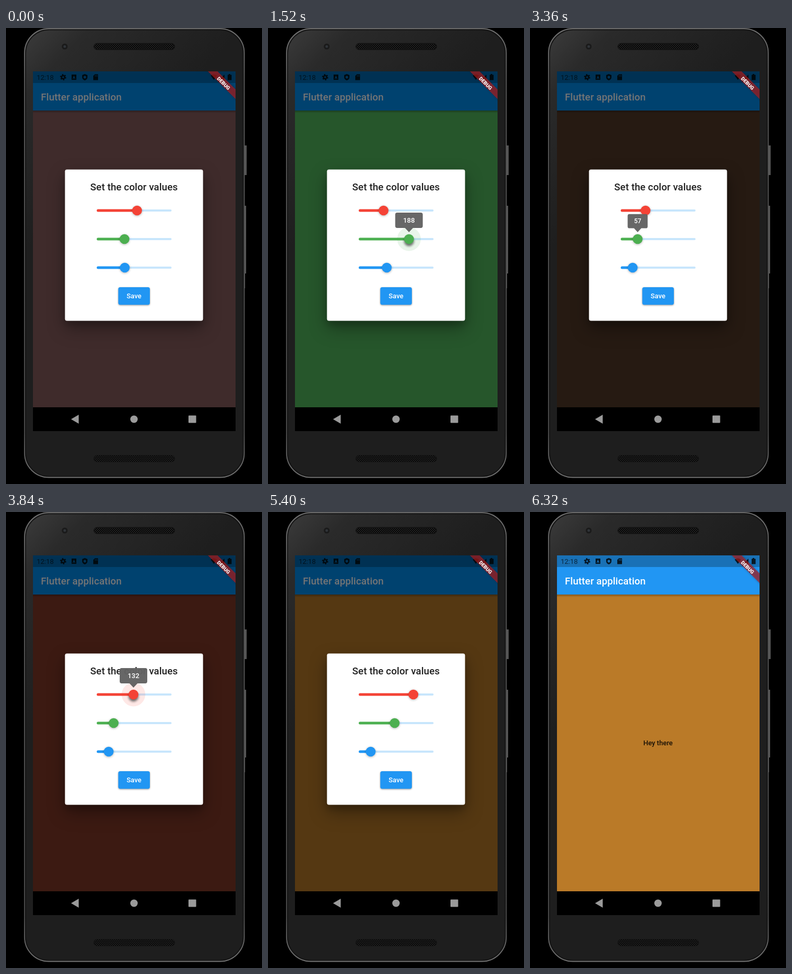
Write an HTML page that moves like this. It is 484 px wide and 862 px high and loops after 6.48 s.

```html
<!DOCTYPE html>
<html lang="en">
<head>
<meta charset="utf-8">
<title>Color sliders</title>
<style>
html, body { margin: 0; width: 100%; height: 100%; overflow: hidden; background: #000; }
svg { display: block; width: 484px; height: 862px; }
text { font-family: Roboto, sans-serif; font-weight: 500; font-size: 13px; }
.mid { text-anchor: middle; }
.head { font-size: 18.6px; letter-spacing: .08px; }
</style>
</head>
<body>
<svg viewBox="0 0 484 862">
  <defs>
    <linearGradient id="shell" x1="0" y1="0" x2=".5" y2="1">
      <stop offset="0" stop-color="#3c3c3c"/><stop offset=".12" stop-color="#2a2a2a"/>
      <stop offset=".4" stop-color="#1e1e1e"/><stop offset="1" stop-color="#1e1e1e"/>
    </linearGradient>
    <linearGradient id="rim" x1="0" y1="0" x2="0" y2="1">
      <stop offset="0" stop-color="#777"/><stop offset=".12" stop-color="#5a5a5a"/>
      <stop offset=".9" stop-color="#4c4c4c"/><stop offset="1" stop-color="#777"/>
    </linearGradient>
    <linearGradient id="fall" x1="0" y1="0" x2="0" y2="1">
      <stop offset="0" stop-opacity=".28"/><stop offset="1" stop-opacity="0"/>
    </linearGradient>
    <pattern id="mesh" width="4" height="4" patternUnits="userSpaceOnUse">
      <rect width="4" height="4" fill="#222"/><circle cx="1" cy="1" r="1.1"/><circle cx="3" cy="3" r="1.1"/>
    </pattern>
    <filter id="soft" x="-50%" y="-50%" width="200%" height="200%"><feGaussianBlur stdDeviation="2"/></filter>
    <clipPath id="screen"><rect x="51" y="82" width="383" height="680"/></clipPath>
    <clipPath id="button"><rect x="212.3" y="490" width="59.7" height="33.3" rx="3.7"/></clipPath>
  </defs>

  <!-- phone -->
  <path d="M450 222h5v56h-5zM450 336h4v128h-4zM449 464h3v28h-3z" fill="#555"/>
  <rect x="35" y="1.2" width="415.5" height="848.300" rx="46" fill="url(#shell)" stroke="url(#rim)" stroke-width="1.800"/>
  <rect x="37.2" y="3.4" width="411" height="844" rx="44" fill="none" stroke="#141414" stroke-width="1.500"/>
  <circle cx="111" cy="35" r="5.5" fill="#1a1a1a"/><circle cx="111" cy="35" r="2.5" fill="#303438"/>
  <rect x="166" y="29" width="153" height="12" rx="6" fill="url(#mesh)" stroke="#111"/>
  <rect x="166" y="808" width="153" height="12" rx="6" fill="url(#mesh)" stroke="#111"/>

  <g clip-path="url(#screen)">
    <!-- page -->
    <rect id="page" x="51" y="156" width="383" height="561"/>
    <text class="mid" x="242" y="441" fill-opacity=".87">Hey there</text>
    <rect x="51" y="156" width="383" height="5" fill="url(#fall)"/>
    <rect id="bar" x="51" y="82" width="383" height="74"/>
    <rect x="51" y="82" width="383" height="22" fill-opacity=".25"/>
    <text class="head" x="66" y="137" fill="#fff">Flutter application</text>
    <text x="58" y="98" fill-opacity=".65" style="font-weight:400">12:18</text>
    <g fill-opacity=".8">
      <circle cx="108" cy="93" r="3" fill="none" stroke="#000" stroke-width="2.6" stroke-opacity=".8"/>
      <circle cx="108" cy="93" r="5" fill="none" stroke="#000" stroke-width="1.8" stroke-dasharray="2.6" stroke-opacity=".8"/>
      <path fill-rule="evenodd" d="M124 88h9v10h-9zM126 96l2.5-6 2.5 6h-1.3l-.5-1.3h-1.5l-.4 1.3z"/>
      <path fill-rule="evenodd" d="M149 87l5 2v4q0 4-5 6q-5-2-5-6v-4zM149 90.5a2.5 2.5 0 1 0 .1 0z"/>
      <path fill-rule="evenodd" d="M168 87.500h6v11h-9v-8zM168 89.500v2h1v-2zM170 89.500v2h1v-2zM172 89.500v2h1v-2z"/>
      <path d="M387 90q6-5 12 0l-6 8zM403 98l10-10v10zM419 88.500h2v-1.500h3v1.500h2.500v10h-7.500z"/>
    </g>
    <path d="M51 717h383v45H51z"/>
    <g fill="#9b9b9b">
      <path d="M123 739.500l14.500-8.500v17z"/><circle cx="242" cy="739.500" r="7"/>
      <rect x="345" y="732.500" width="14.500" height="14" rx="1"/>
    </g>

    <!-- dialog -->
    <rect id="barrier" x="51" y="82" width="383" height="635"/>
    <g id="dialog">
      <rect x="111.500" y="267.500" width="261" height="286" rx="3.700" fill="#fff"
        style="filter:drop-shadow(0 7px 7px #0003) drop-shadow(0 13px 16px #0005)"/>
      <text class="head mid" x="242" y="307" fill-opacity=".87">Set the color values</text>
      <g id="sliders"></g>
      <rect x="212.300" y="490" width="59.700" height="33.300" rx="3.700" fill="#2196f3" style="filter:drop-shadow(0 1.500px 1.500px #0006)"/>
      <circle id="ripple" cx="242" cy="507" fill="#fff" clip-path="url(#button)"/>
      <text class="mid" x="242" y="511.300" fill="#fff">Save</text>
      <g id="tips"></g>
    </g>

    <!-- corner ribbon -->
    <g transform="translate(434 82) rotate(45)">
      <rect x="-60" y="24" width="120" height="13" fill-opacity=".25" filter="url(#soft)"/>
      <rect x="-60" y="24" width="120" height="13" fill="#b71c1c" fill-opacity=".66"/>
      <text class="mid" y="35.300" fill="#fff" style="font-size:9.500px;font-weight:900">DEBUG</text>
    </g>
  </g>
</svg>
<script>
const LOOP = 6480, STEP = 40, LEFT = 172, WIDTH = 141;
const $ = id => document.getElementById(id);
const clamp = x => Math.max(0, Math.min(1, x));
const smooth = x => (x = clamp(x), x * x * (3 - 2 * x));
const set = (el, attrs) => { for (const k in attrs) el.setAttribute(k, attrs[k]); };

// keys: [ms, value]; drags: [press, release]
const sliders = [
  { y: 345, color: '#f44336', keys: [[120, 137], [700, 84], [3560, 84], [4160, 186]], drags: [[80, 800], [3500, 4240]] },
  { y: 399, color: '#4caf50',
    keys: [[1000, 94], [1480, 171], [1520, 188], [2860, 188], [3180, 57], [4472, 57], [4480, 63], [4520, 73], [4840, 122]],
    drags: [[960, 1840], [2843, 3220], [4472, 5040]] },
  { y: 453, color: '#2196f3', keys: [[2120, 95], [2520, 40]], drags: [[2080, 2600]] }
];

function valueAt(keys, t) {
  const i = keys.findIndex(k => k[0] > t);
  if (i < 0) return keys[keys.length - 1][1];
  if (!i) return keys[0][1];
  const [t0, a] = keys[i - 1], [t1, b] = keys[i];
  return a + (b - a) * (t - t0) / (t1 - t0);
}

// 100 ms in after press, 100 ms out after release; a tip stays at least `hold` ms
const shown = (drags, t, hold) => Math.max(...drags.map(([on, off]) =>
  smooth((t - on) / 100) * (1 - smooth((t - Math.max(off, on + hold)) / 100))));

for (const s of sliders) {
  $('sliders').insertAdjacentHTML('beforeend', `<g>
    <rect x="${LEFT}" y="${s.y - 1.9}" width="${WIDTH}" height="3.800" rx="1.900" fill="#c8e6fc"/>
    <rect x="${LEFT - .5}" y="${s.y - 2.5}" height="5" rx="2.500" fill="${s.color}"/>
    <circle cy="${s.y}" fill="${s.color}" fill-opacity=".12"/>
    <circle r="9.300" filter="url(#soft)"/>
    <circle cy="${s.y}" r="9.300" fill="${s.color}"/></g>`);
  [, s.track, s.halo, s.shade, s.thumb] = $('sliders').lastChild.children;
  $('tips').insertAdjacentHTML('beforeend',
    '<g><path fill="#636363" fill-opacity=".97"/><text class="mid" y="-18" fill="#fff"></text></g>');
  s.tip = $('tips').lastChild;
}

function drawSlider(s, t) {
  const x = LEFT + valueAt(s.keys, t - STEP) * WIDTH / 255;
  const press = shown(s.drags, t, 0), scale = shown(s.drags, t, 500);
  const label = Math.round(valueAt(s.keys, t));
  set(s.track, { width: x - LEFT });
  set(s.halo, { cx: x, r: 22.4 * press });
  set(s.shade, { cx: x, cy: s.y + 1 + 3 * press, opacity: .3 + .25 * press });
  set(s.thumb, { cx: x });

  const half = (String(label).length * 7.7 + 29) * scale / 2;
  const [path, text] = s.tip.children;
  set(s.tip, { transform: `translate(${x} ${s.y - 13}) scale(${scale})`, visibility: scale > .01 ? 'visible' : 'hidden' });
  const r = Math.min(3.7, half), arm = Math.min(7.5, half - r);
  set(path, { d: `M0 0L${-arm} -8H${r - half}q${-r} 0 ${-r} ${-r}V${r - 37}q0 ${-r} ${r} ${-r}` +
    `H${half - r}q${r} 0 ${r} ${r}V${-8 - r}q0 ${r} ${-r} ${r}H${arm}z` });
  text.textContent = label;
  return label;
}

function draw(now) {
  const t = Math.floor(now % LOOP / STEP) * STEP;
  const rgb = sliders.map(s => drawSlider(s, t));
  set($('page'), { fill: `rgb(${rgb})` });
  const open = 1 - smooth((t - 5600) / 160);
  // the bar loses its red tint while dimmed
  set($('bar'), { fill: `rgb(${33 * (1 - open)},${150 - 6 * open},243)` });
  set($('barrier'), { 'fill-opacity': .54 * open });
  set($('dialog'), { opacity: open });
  const tap = clamp((t - 5400) / 200);
  set($('ripple'), { r: 36 * tap, 'fill-opacity': tap ? .24 : 0 });
}

const start = performance.now();
function tick() {
  draw(performance.now() - start);
  requestAnimationFrame(tick);
}
tick();
</script>
</body>
</html>
```
